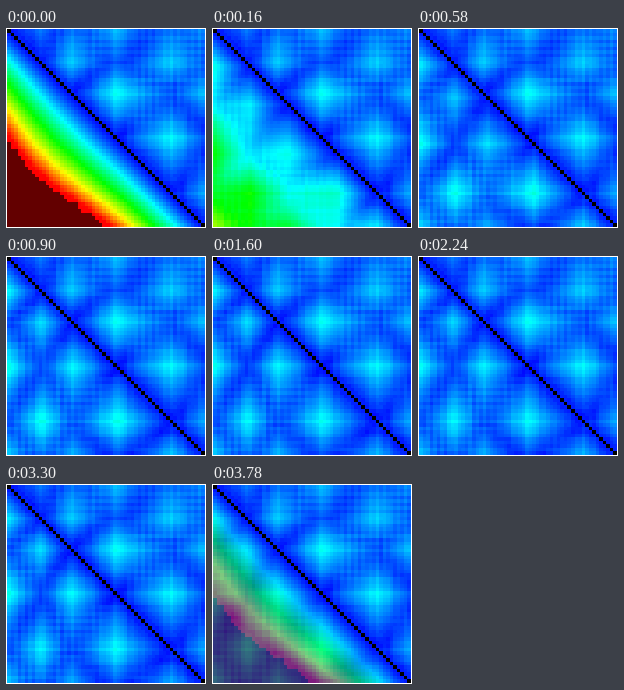
A matplotlib script for the animation above (3840 ms loop, 200 by 200 pixels).

```python
import numpy as np
import matplotlib.pyplot as plt
from matplotlib.animation import FuncAnimation
from matplotlib.colors import LinearSegmentedColormap

SIZE = 200
N = 56            # beads in the chain
TICK = 20         # ms
LOOP = 3840       # ms
STEPS = 48        # poses per loop, held 100 and 60 ms in turn
FOLD_TIME = 320   # ms

rng = np.random.default_rng(7)
bead = np.arange(N)
pos = (bead + 0.5) * SIZE / N
roughness = rng.normal(0, 0.025, (3, N))
wobble_phase = rng.uniform(0, 2 * np.pi, (3, 9))
wobble_rate = rng.uniform(0.25, 0.9, (3, 9))
row, col = np.indices((N, N))
lower = row > col

cmap = LinearSegmentedColormap.from_list(
    "distance", ["#0000ff", "#00ffff", "#00ff00", "#ffff00", "#ff0000"], N=512)
MAX_DIST = 4.0
CUTOFF = 4.25
FAR = (0.39, 0, 0)

# The chain runs up and down a barrel of five strands.
TURNS = np.array([0, 35, 65, 110, 165, 199])
NATIVE_HEIGHTS = np.array([0.10, -0.38, 0.48, -0.60, 0.40, -0.30])
FOLDED_HEIGHTS = np.array([0.48, -0.48, 0.46, -0.56, 0.48, -0.25])
EARLY_DRIFT = np.array([0, 3, 10, 15, 0, 0])
EARLY_LIFT = np.array([0.1, 0, -0.05, 0.03, 0.17, 0])
BARREL_SLOT = np.array([1, 0, 4, 2, 3])


def chain(turns, heights):
    """3D bead positions of the folded chain."""
    mids = (turns[:-1] + turns[1:]) / 2
    angle = 2 * np.pi * BARREL_SLOT / 5
    pleat = 1 + 0.18 * (-1.0) ** bead
    return np.array([
        np.interp(pos, turns, heights),
        0.23 * pleat * np.interp(pos, mids, np.cos(angle)),
        0.23 * pleat * np.interp(pos, mids, np.sin(angle)),
    ]) + roughness


def distances(points):
    diff = points[:, :, None] - points[:, None, :]
    return np.sqrt((diff ** 2).sum(axis=0))


def stretched():
    """Distances in the unfolded chain, a little shorter around its middle."""
    gap = np.abs(pos[:, None] - pos[None, :])
    middle = (pos[:, None] + pos[None, :]) / 2
    reach = 94 + 24 * np.exp(-((middle - 85) / 55) ** 2)
    ripple = roughness[0][:, None] + roughness[1][None, :]
    return CUTOFF * (gap / reach) ** 1.2 * (1 + 0.3 * ripple)


def wobble(k):
    knots = np.linspace(0, SIZE, wobble_phase.shape[1])
    swing = 0.03 * np.sin(wobble_rate * k + wobble_phase)
    return np.array([np.interp(pos, knots, s) for s in swing])


native = distances(chain(TURNS, NATIVE_HEIGHTS))
unfolded = stretched()


def picture(k):
    ms = 160 * (k // 2) + 100 * (k % 2)
    after = max(0, ms - FOLD_TIME)
    turns = TURNS + EARLY_DRIFT * np.exp(-after / 280)
    heights = FOLDED_HEIGHTS + EARLY_LIFT * np.exp(-after / 900)
    folded = distances(chain(turns, heights) + wobble(k))
    left = max(0, 1 - ms / FOLD_TIME) ** 2
    dist = np.where(lower, left * unfolded + (1 - left) * folded, native)
    rgb = cmap(dist / MAX_DIST)[..., :3]
    rgb[dist > CUTOFF] = FAR
    rgb[bead, bead] = 0
    return rgb


poses = [picture(k) for k in range(STEPS)]
poses[-1] = (poses[-1] + poses[0]) / 2    # dissolve into the start

fig = plt.figure(figsize=(2, 2), dpi=100, facecolor="white")
ax = fig.add_axes([1 / SIZE, 1 / SIZE, 1 - 2 / SIZE, 1 - 2 / SIZE])
ax.axis("off")
image = ax.imshow(poses[0], interpolation="nearest", aspect="auto")


def update(frame):
    pair, rest = divmod(frame * TICK, 160)
    image.set_data(poses[2 * pair + (rest >= 100)])
    return [image]


anim = FuncAnimation(fig, update, frames=LOOP // TICK, interval=TICK,
                     repeat=True, repeat_delay=0)
plt.show()
```
